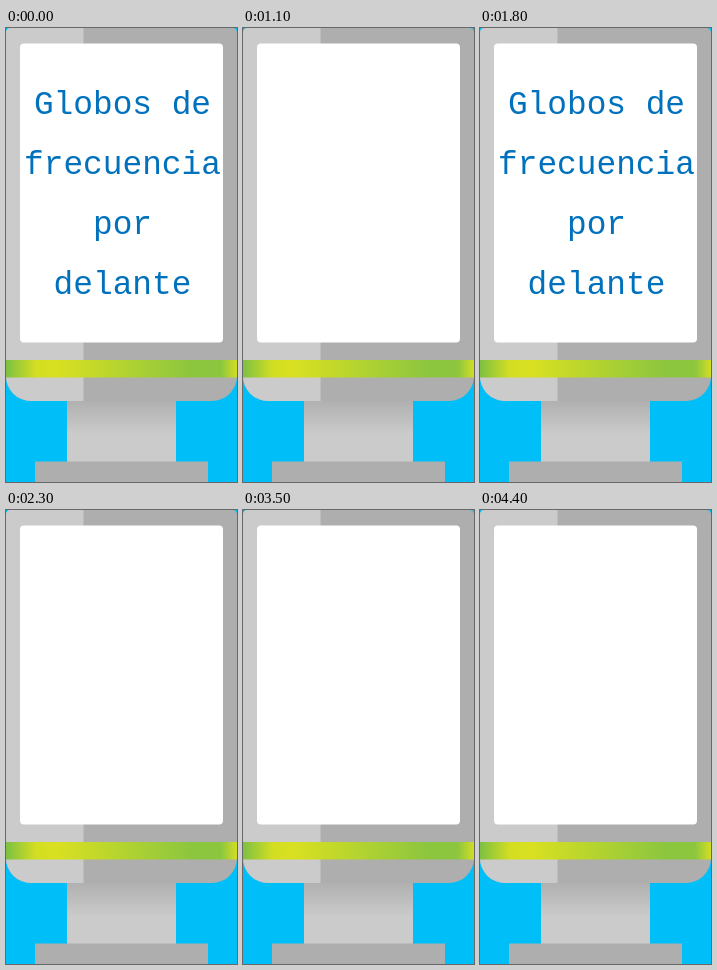
An HTML page for the animation above (4.5 s loop, 231 px wide and 454 px high).

```html
<!DOCTYPE html>
<html lang="es">
<head>
<meta charset="utf-8">
<style>
  html, body { margin: 0; width: 100%; height: 100%; overflow: hidden; background: #00bff8; }
  svg { display: block; width: 231px; height: 454px; }
  text { font: 32.8px "Liberation Mono", monospace; fill: #0071bc; text-anchor: middle; }
</style>
</head>
<body>
<svg viewBox="0 0 231 454">
  <defs>
    <linearGradient id="stripe">
      <stop offset="0" stop-color="#7dc043"/>
      <stop offset=".13" stop-color="#d3de22"/>
      <stop offset=".22" stop-color="#d9e021"/>
      <stop offset=".8" stop-color="#8cc63f"/>
      <stop offset=".93" stop-color="#8cc63f"/>
      <stop offset="1" stop-color="#d3de22"/>
    </linearGradient>
    <linearGradient id="stem" x2="0" y2="1">
      <stop offset="0" stop-color="#b0b0b0"/>
      <stop offset=".55" stop-color="#cbcbcb"/>
    </linearGradient>
    <clipPath id="body">
      <path d="M5 0H226Q231 0 231 5V348A25 25 0 0 1 206 373H25A25 25 0 0 1 0 348V5Q0 0 5 0Z"/>
    </clipPath>
  </defs>
  <rect x="61" y="373" width="109" height="61" fill="url(#stem)"/>
  <rect x="29" y="433.5" width="173" height="21" fill="#aeaeae"/>
  <g clip-path="url(#body)">
    <rect width="231" height="373" fill="#aeaeae"/>
    <rect width="77.5" height="373" fill="#cbcbcb"/>
    <rect y="332" width="231" height="17.5" fill="url(#stripe)"/>
  </g>
  <rect x="14" y="15.5" width="203" height="299" rx="4" fill="#fff"/>
  <g id="message"></g>
</svg>
<script>
  const LOOP = 4500, BLINK = 300, ON = 200, SWITCH = 2100;
  const messages = [
    ["Globos de", "frecuencia", "por", "delante"],
    ["Siga", "adelante", "con", "cuidado"]
  ];
  const group = document.getElementById("message");
  let shown;

  function draw(now) {
    const t = now % LOOP;
    const index = t % BLINK < ON ? +(t >= SWITCH) : -1;
    if (index !== shown) {
      shown = index;
      group.innerHTML = (messages[index] || [])
        .map((line, i) => `<text x="116.5" y="${86 + 60 * i}">${line}</text>`)
        .join("");
    }
  }

  const start = performance.now();
  function tick() {
    draw(performance.now() - start);
    requestAnimationFrame(tick);
  }
  tick();
</script>
</body>
</html>
```
